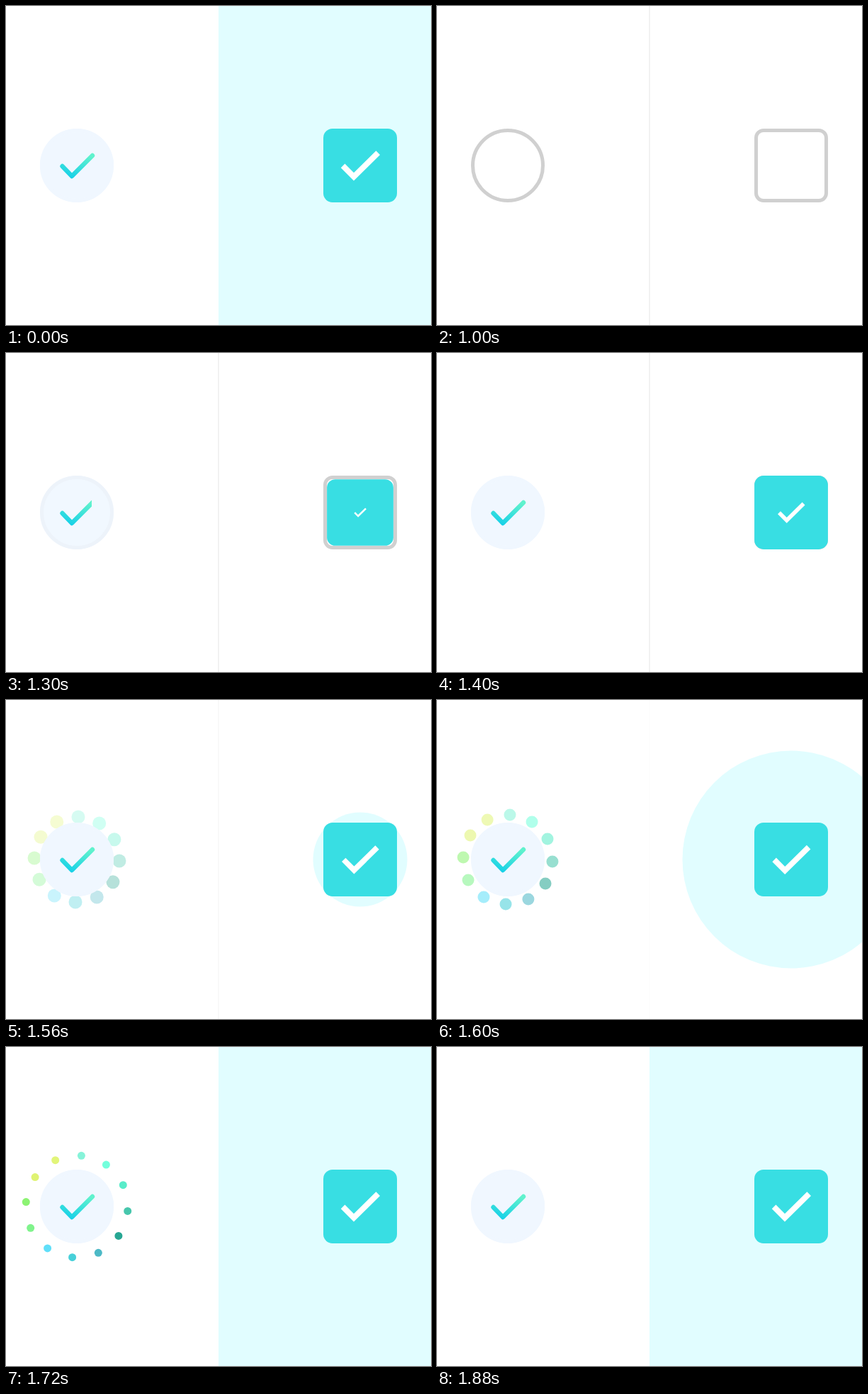
Animation, 600 px wide and 450 px high, one loop 2.18 s. Source, as an HTML page:

```html
<!DOCTYPE html>
<html lang="en">
<head>
<meta charset="utf-8">
<title>Checkbox animations</title>
<style>
  html, body { margin: 0; width: 100%; height: 100%; overflow: hidden; background: #fff; }
  svg { display: block; width: 100vw; height: 100vh; }
</style>
</head>
<body>
<svg viewBox="0 0 600 450">
  <defs>
    <linearGradient id="mint" gradientUnits="userSpaceOnUse" x1="92" y1="243" x2="104" y2="207">
      <stop offset="0" stop-color="#16d0e8"/>
      <stop offset="1" stop-color="#60f2cd"/>
    </linearGradient>
    <clipPath id="wipe"><rect id="wipeRect" x="76" y="200" width="0" height="50"/></clipPath>
    <clipPath id="rightHalf"><rect x="300" y="0" width="300" height="450"/></clipPath>
  </defs>

  <rect id="divider" x="299" width="2" height="450" fill="#f2f2f2"/>

  <g id="dots"></g>
  <circle id="disc" cx="100" cy="225" r="52"/>
  <circle id="ring" cx="100" cy="225" r="49.5" fill="none" stroke-width="5"/>
  <path d="M79.5 226 L93 240 L122 211" fill="none" stroke="url(#mint)" stroke-width="6.4"
        stroke-linecap="round" stroke-linejoin="round" clip-path="url(#wipe)"/>

  <g clip-path="url(#rightHalf)">
    <circle id="ripple" cx="500" cy="225" fill="#e1fdff"/>
    <rect id="frame" x="450.5" y="175.5" width="99" height="99" rx="10.5" fill="#fff" stroke="#d0d0d0" stroke-width="5"/>
    <rect id="box" x="-52" y="-52" width="104" height="104" rx="13" fill="#38dee3"/>
    <path id="tick" d="M-24.4 .4 L-9 15.8 L25.2 -17.8" fill="none" stroke="#fff" stroke-width="8"/>
  </g>
</svg>
<script>
const LOOP = 2180, UNCHECK = 1000, CHECK = 1100, BURST = 1500, END = 1880, STEP = 20;
const COLORS = ['#77f1d4', '#62ffd8', '#45eac2', '#30bfa2', '#0c9b86', '#37b0bf',
                '#30cad4', '#4cdbf8', '#70f17e', '#7ef162', '#dbf162', '#def469'];
const $ = id => document.getElementById(id);
const set = (el, attrs) => { for (const k in attrs) el.setAttribute(k, attrs[k]); };
const clamp = v => Math.min(1, Math.max(0, v));
const mix = (a, b, p) => `rgb(${a.map((v, i) => Math.round(v + (b[i] - v) * p))})`;

const dots = COLORS.map(fill => {
  const dot = document.createElementNS('http://www.w3.org/2000/svg', 'circle');
  set(dot, { fill });
  return $('dots').appendChild(dot);
});

// The standard CSS "ease" curve, cubic-bezier(.25, .1, .25, 1)
function ease(x) {
  if (x <= 0 || x >= 1) return clamp(x);
  const bezier = (a, b, s) => 3 * (1 - s) ** 2 * s * a + 3 * (1 - s) * s * s * b + s ** 3;
  let lo = 0, hi = 1;
  for (let i = 0; i < 24; i++) {
    const mid = (lo + hi) / 2;
    if (bezier(.25, .25, mid) < x) lo = mid; else hi = mid;
  }
  return bezier(.1, 1, lo);
}

function drawDots(time) {
  const opacity = time <= 0 ? 0 : clamp(Math.min(time / 200, (END - BURST - time) / 180));
  const distance = 55.5 + .075 * time;
  const r = Math.max(0, 11 - .025 * time);
  dots.forEach((dot, i) => {
    const angle = (i * 30 + .7 + .02 * time) * Math.PI / 180;
    set(dot, { cx: 100 + distance * Math.sin(angle), cy: 225 - distance * Math.cos(angle), r, opacity });
  });
}

function draw(time) {
  const t = time < UNCHECK || time >= END ? Infinity : time;
  const progress = (start, duration) => ease(clamp((t - start) / duration));
  const fill = progress(CHECK, 320);
  const place = scale => `translate(500 225) scale(${scale})`;

  set($('divider'), { opacity: 1 - progress(BURST, 200) });
  set($('disc'), { fill: mix([255, 255, 255], [240, 247, 255], fill) });
  set($('ring'), { stroke: mix([208, 208, 208], [240, 247, 255], fill) });
  set($('wipeRect'), { width: 50 * fill });
  set($('frame'), { opacity: fill < 1 ? 1 : 0 });
  set($('box'), { transform: place(fill) });
  set($('tick'), { transform: place(progress(1195, 500)) });
  set($('ripple'), { r: 520 * progress(BURST, 500) });
  drawDots(Math.min(t, END) - BURST);
}

const origin = performance.now();
function tick() {
  const time = (performance.now() - origin) % LOOP;
  draw(Math.floor(time / STEP) * STEP);
  requestAnimationFrame(tick);
}
tick();
</script>
</body>
</html>
```
